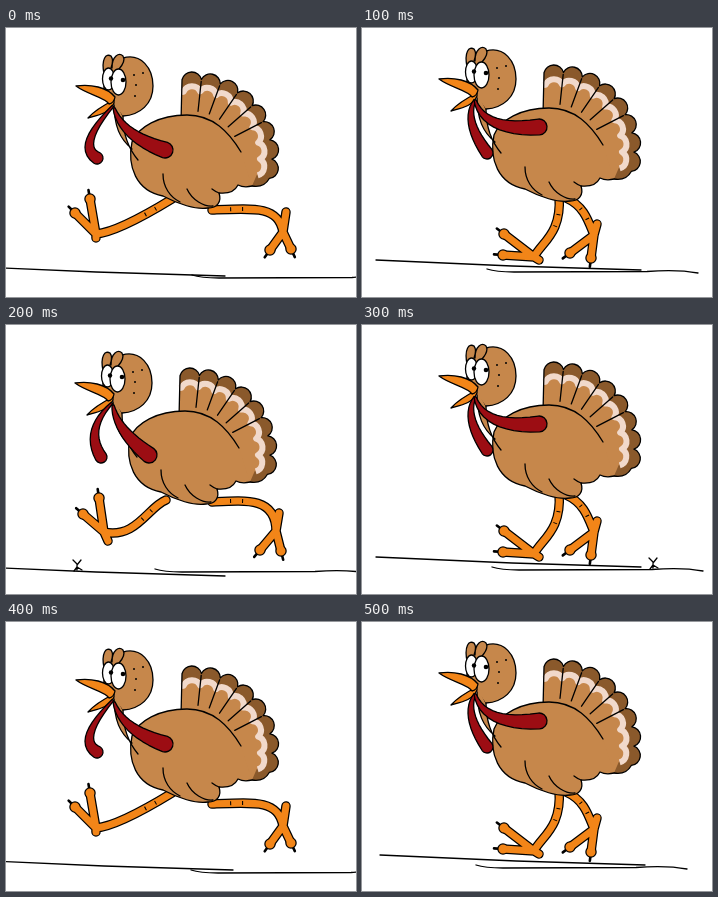
Animation of 350 by 269 pixels, one loop 0.6 s. Source, as an HTML page:

```html
<!DOCTYPE html>
<html lang="en">
<head>
<meta charset="utf-8">
<title>Running turkey</title>
<style>
  html, body { margin: 0; height: 100%; overflow: hidden; background: #fff; }
  svg { display: block; width: 100vw; height: 100vh; }
  svg g { stroke: #000; stroke-width: 1.3; stroke-linecap: round; stroke-linejoin: round; fill: none; }
  svg .tan { fill: #c6874b; }
  svg .dark { fill: #8a592b; }
  svg .pink { stroke: #f1d9cb; stroke-width: 6; stroke-linecap: butt; }
  svg .orange { fill: #f28518; }
  svg .red { fill: #9c0d13; }
  svg .white { fill: #fff; }
  svg .black { fill: #000; stroke: none; }
  svg .plain { stroke: none; }
  svg .claw { stroke-width: 2.6; }
  svg .edge { stroke-width: 9.5; }
  svg .skin { stroke: #f28518; stroke-width: 7; }
  svg .ticks { stroke-width: 4; stroke-linecap: butt; stroke-dasharray: 0 18 1 11 1 999; }
</style>
</head>
<body>
<svg viewBox="0 0 350 269">
  <defs>
    <g id="body">
      <g id="tail"></g>
      <path class="tan" d="M235 124C223 104 207 87 181 87C153 87 132 99 126 114C121 138 130 163 157 168C172 176 190 182 202 180C211 180 216 174 213 165C222 166 229 163 232 157Q238 160 246 158"/>
      <path d="M157 146C157 159 164 169 174 174M181 161C186 172 198 179 207 178M213 165Q210 164 206 161"/>
    </g>
    <g id="head">
      <path class="tan" d="M132 132C122 120 117 105 117 88L112 78L108 74C108 99 114 111 126 121"/>
      <path class="tan" d="M98 62V40L117 30C135 25 147 40 147 58C147 76 134 87 117 88"/>
      <path class="tan" d="M98 46C95 31 100 25 105 28Q108 32 105 40M106 40C106 28 113 24 117 28Q120 33 113 41"/>
      <ellipse class="white" cx="102.500" cy="51" rx="6" ry="11"/>
      <ellipse class="white" cx="112.500" cy="54" rx="7.500" ry="13"/>
      <g class="black">
        <circle cx="105" cy="50.500" r="2.200"/><circle cx="117" cy="52" r="2.300"/>
        <circle cx="128" cy="47" r="1"/><circle cx="137" cy="45" r="1"/>
        <circle cx="130" cy="57" r="1"/><circle cx="129" cy="68" r="1"/>
      </g>
      <path class="orange" d="M108 72C98 77 89 82 82 90C93 87 104 85 108 75Z"/>
      <path class="orange" d="M70 58C85 56 101 59 109 69Q108 75 103 76C99 69 82 67 70 58Z"/>
    </g>
  </defs>
  <g id="far"><path d="M14 232L150 238L279 242"/></g>
  <g id="near"><path d="M125 241Q134 244 152 244L285 243.500Q315 241 336 245"/></g>
  <g id="grass"><path d="M0 10V4L-4 0M0 5L4 0M-3 11L0 7L5 10"/></g>
  <g id="bird"></g>
</svg>
<script>
const $ = id => document.getElementById(id);

// Tail fan: feathers spread evenly over an arc.
const feathers = 8, from = -98, sweep = 113;
function polar(r, i) {
  const a = (from + sweep * i / feathers) * Math.PI / 180;
  return `${187 + r * Math.cos(a)} ${130 + r * Math.sin(a)}`;
}
function fan(r, bulge) {
  let d = polar(r, 0);
  for (let i = 1; i <= feathers; i++) d += `A${bulge} ${bulge} 0 0 1 ${polar(r, i)}`;
  return d;
}
const rim = `M175 94L${fan(79, 10)}Q258 160 246 158`;
let ribs = '';
for (let i = 1; i < 6; i++) ribs += `M${polar(47, i)}L${polar(77, i)}`;
$('tail').innerHTML = `
  <path class="dark plain" d="${rim}L225 140Z"/>
  <path class="tan plain" d="M175 64L${fan(66, 9)}L246 158L225 140L175 95Z"/>
  <path class="pink" d="M175 64L${fan(67, 9)}"/>
  <path d="${rim}${ribs}"/>`;

// Teardrop that widens along a quadratic curve and ends in a half circle.
function drop([x0, y0, x1, y1, x2, y2, r]) {
  const left = [], right = [], n = 12;
  for (let i = 0; i <= n; i++) {
    const t = i / n, u = 1 - t, w = 1 + (r - 1) * t ** 0.9;
    const x = u * u * x0 + 2 * u * t * x1 + t * t * x2;
    const y = u * u * y0 + 2 * u * t * y1 + t * t * y2;
    const a = Math.atan2(u * (y1 - y0) + t * (y2 - y1), u * (x1 - x0) + t * (x2 - x1));
    const dx = w * Math.sin(a), dy = -w * Math.cos(a);
    left.push(`${x + dx} ${y + dy}`);
    right.unshift(`${x - dx} ${y - dy}`);
  }
  return `<path class="red" d="M${left.join('L')}A${r} ${r} 0 0 1 ${right.join('L')}Z"/>`;
}

// Leg: a shank curve ending at the ankle, a heel and two clawed toes.
function leg({ shank, heel, toes }) {
  const [ax, ay] = shank.split(' ').slice(-2).map(Number);
  let lines = `${shank}L${heel}`, bulbs = '', claws = '';
  for (const [x, y] of toes) {
    const k = 9 / Math.hypot(x - ax, y - ay);
    lines += `M${ax} ${ay}L${x} ${y}`;
    bulbs += `<circle cx="${x}" cy="${y}" r="1"/>`;
    claws += `M${x} ${y}l${k * (x - ax)} ${k * (y - ay)}`;
  }
  const shape = `<path d="${lines}"/>${bulbs}`;
  return `<path class="claw" d="${claws}"/><g class="edge">${shape}</g>
    <g class="skin">${shape}</g><path class="ticks" d="${shank}"/>`;
}

const poses = {
  stretch: {
    body: [0, 0], head: [0, 0],
    legs: [
      { shank: 'M206 182 C 250 180 272 178 277 204', heel: '280 184', toes: [[264, 222], [285, 221]] },
      { shank: 'M166 171 Q 112 204 90 206', heel: '90 210', toes: [[69, 185], [84, 171]] }
    ],
    wattles: [[107, 78, 70, 118, 91, 130, 6], [108, 80, 116, 108, 159, 122, 8]]
  },
  gather: {
    body: [6, -7], head: [7, -7],
    legs: [
      { shank: 'M204 170 C 222 178 226 192 232 207', heel: '235 196', toes: [[208, 225], [229, 230]] },
      { shank: 'M197 168 C 200 205 180 214 172 229', heel: '177 232', toes: [[142, 206], [141, 227]] }
    ],
    wattles: [[113, 72, 101, 92, 125, 125, 6], [113, 72, 122, 104, 177, 99, 8]]
  },
  reach: {
    body: [-2, -1], head: [-1, 0],
    legs: [
      { shank: 'M206 177 C 240 175 270 172 270 206', heel: '273 188', toes: [[254, 225], [275, 226]] },
      { shank: 'M160 175 C 142 182 130 214 98 207', heel: '102 216', toes: [[77, 189], [93, 173]] }
    ],
    wattles: [[106, 78, 78, 105, 95, 132, 6], [107, 80, 110, 105, 143, 130, 8]]
  }
};

const use = (id, at) => `<use href="#${id}" x="${at[0]}" y="${at[1]}"/>`;
for (const [name, p] of Object.entries(poses)) {
  $('bird').innerHTML += `<g id="${name}">${p.legs.map(leg).join('')}
    ${use('body', p.body)}${use('head', p.head)}${p.wattles.map(drop).join('')}</g>`;
}

// Each step lasts 100 ms: the pose and where the ground lines and grass lie.
const steps = [
  { pose: 'stretch', far: [-60, 6], near: [61, 6] },
  { pose: 'gather', far: [0, 0], near: [0, 0] },
  { pose: 'reach', far: [-60, 9], near: [24, 3], grass: [71, 235] },
  { pose: 'gather', far: [0, 0], near: [5, 1], grass: [291, 233] },
  { pose: 'stretch', far: [-52, 6], near: [60, 7] },
  { pose: 'gather', far: [4, 1], near: [-11, 2] }
];

function draw(now) {
  const step = steps[Math.floor(now / 100) % steps.length];
  for (const name in poses) $(name).style.display = name === step.pose ? '' : 'none';
  for (const id of ['far', 'near', 'grass']) {
    $(id).style.display = step[id] ? '' : 'none';
    if (step[id]) $(id).setAttribute('transform', `translate(${step[id]})`);
  }
}

const start = performance.now();
function tick() {
  draw(performance.now() - start);
  requestAnimationFrame(tick);
}
tick();
</script>
</body>
</html>
```
